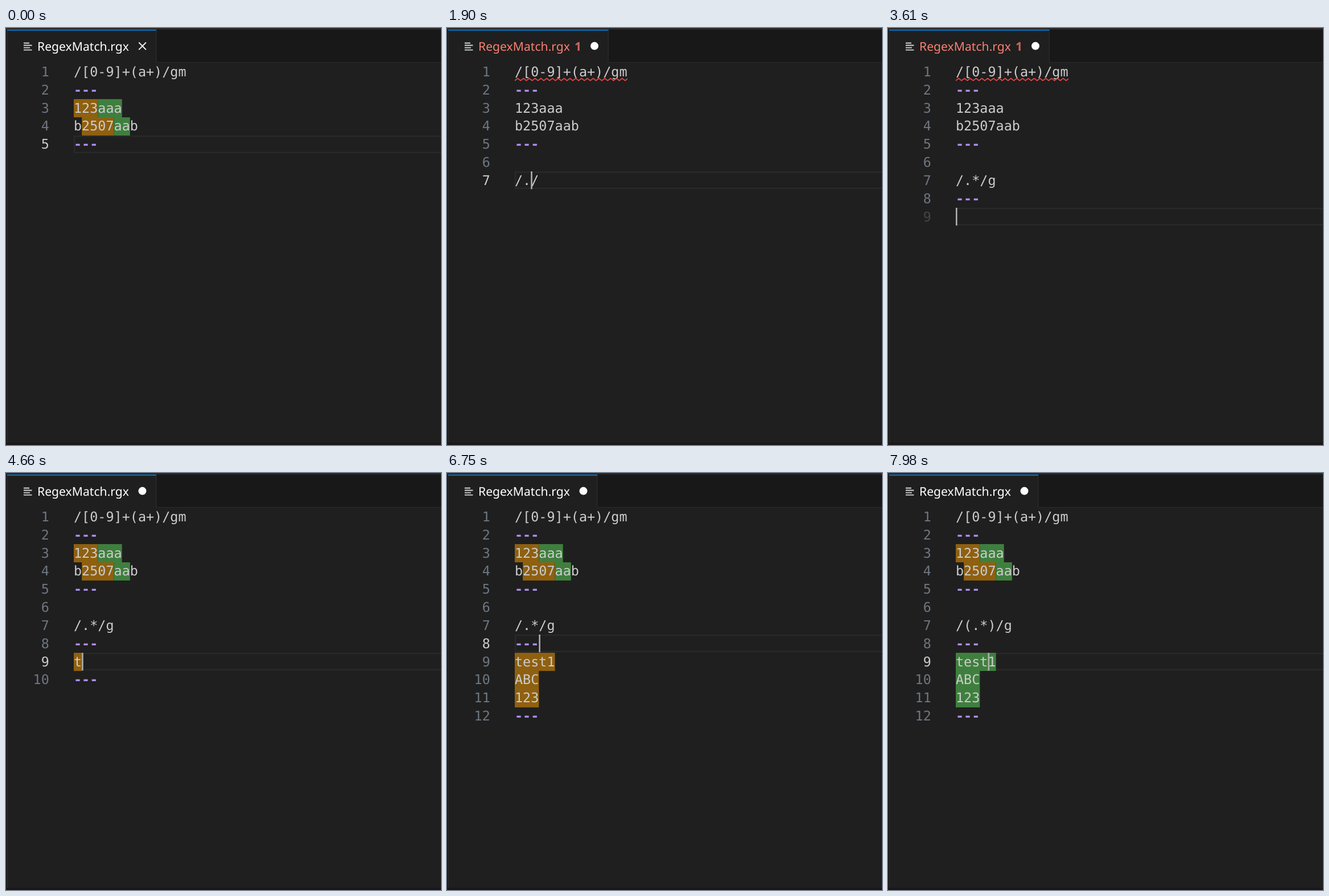
An HTML page that plays this animation: 764 by 733 pixels, repeating every 8 s.

```html
<!DOCTYPE html>
<html lang="en">
<head>
<meta charset="utf-8">
<title>Editor</title>
<style>
  html, body { margin: 0; width: 100%; height: 100%; overflow: hidden; background: #1f1f1f; }
  svg { display: block; width: 764px; height: 733px; }
  text { font: 23.45px "DejaVu Sans Mono", monospace; fill: #ccc; white-space: pre; text-rendering: geometricPrecision; }
  .rule { font-weight: bold; fill: #ae8ff2; }
  .num { text-anchor: end; fill: #6e7681; }
  .active { fill: #ccc; }
  .dim { fill: #43464b; }
  .tab { font: 21.15px "Noto Sans", "Open Sans", sans-serif; fill: #fff; }
  .bad { fill: #f88070; }
  .count { font-weight: 600; fill: #c9695d; }
</style>
</head>
<body>
<svg id="stage" viewBox="0 0 764 733"></svg>
<script>
const LOOP = 8000, LEFT = 119, CHAR = 14.117, ROW = 31.83, TOP = 61.5, BASELINE = 84.9;
const ORANGE = '#8f600f', GREEN = '#3f7f3e';
const HEAD = ['/[0-9]+(a+)/gm', '---', '123aaa', 'b2507aab', '---'];
const ERROR_FROM = 950, ERROR_TO = 4090;

// [start ms, lines below the head joined by "|", cursor row, column, selection start]
const STEPS = [
  [0, null, 5, 3],
  [100, '', 6, 0],
  [380, '|', 7, 0],
  [860, '|//', 7, 1],
  [1710, '|/./', 7, 2],
  [2000, '|/.*/', 7, 3],
  [2280, '|/.*/', 7, 4],
  [2470, '|/.*/g', 7, 5],
  [2660, '|/.*/g|', 8, 0],
  [3140, '|/.*/g|-', 8, 1],
  [3230, '|/.*/g|--', 8, 2],
  [3330, '|/.*/g|---', 8, 3],
  [3520, '|/.*/g|---|', 9, 0],
  [3800, '|/.*/g|---|-', 9, 1],
  [3900, '|/.*/g|---|--', 9, 2],
  [3990, '|/.*/g|---|---', 9, 3],
  [4370, '|/.*/g|---||---', 9, 0],
  [4560, '|/.*/g|---|t|---', 9, 1],
  [4850, '|/.*/g|---|te|---', 9, 2],
  [4940, '|/.*/g|---|tes|---', 9, 3],
  [5040, '|/.*/g|---|test|---', 9, 4],
  [5130, '|/.*/g|---|test1|---', 9, 5],
  [5320, '|/.*/g|---|test1||---', 10, 0],
  [5510, '|/.*/g|---|test1|A|---', 10, 1],
  [5610, '|/.*/g|---|test1|AB|---', 10, 2],
  [5800, '|/.*/g|---|test1|ABC|---', 10, 3],
  [6080, '|/.*/g|---|test1|ABC||---', 11, 0],
  [6180, '|/.*/g|---|test1|ABC|1|---', 11, 1],
  [6270, '|/.*/g|---|test1|ABC|12|---', 11, 2],
  [6370, '|/.*/g|---|test1|ABC|123|---', 11, 3]
];
const typed = STEPS[STEPS.length - 1][1], wrapped = typed.replace('.*', '(.*)');
STEPS.push(
  [6460, typed, 10, 3],
  [6560, typed, 9, 3],
  [6650, typed, 8, 3],
  [6840, typed, 7, 3],
  [6940, typed, 7, 2],
  [7030, typed, 7, 1],
  [7130, typed, 7, 2, 1],
  [7220, typed, 7, 3, 1],
  [7510, wrapped, 7, 4, 2],
  [7890, wrapped, 8, 3],
  [7980, wrapped, 9, 4]
);

const rect = (x, y, w, h, fill) => `<rect x="${x}" y="${y}" width="${w}" height="${h}" fill="${fill}"/>`;
const text = (x, y, s, cls = '') => `<text x="${x}" y="${y}" class="${cls}">${s}</text>`;
const line = (d, color, w) => `<path d="${d}" fill="none" stroke="${color}" stroke-width="${w}"/>`;
const colX = col => LEFT + col * CHAR;
const rowY = row => Math.round(TOP + (row - 1) * ROW);
const baseY = row => Math.round(BASELINE + (row - 1) * ROW);
const mark = (row, from, to, color) =>
  rect(colX(from), rowY(row), (to - from) * CHAR, rowY(row + 1) - rowY(row), color);

function drawFrame(dirty, error) {
  const edge = error ? 283.5 : 264;
  let out = rect(0, 0, 764, 733, '#1f1f1f') + rect(0, 0, 2, 733, '#191919')
    + rect(2, 0, 1.2, 733, '#2d2d2d') + rect(edge, 3, 500, 57.5, '#181818')
    + rect(edge - 1, 3, 1.4, 57.5, '#2b2b2b') + rect(edge, 59.8, 500, 1.4, '#292929')
    + rect(0, 0, 764, 2.5, '#2a2a2a') + rect(2, 2.7, edge - 2, 2, '#0b76c8')
    + rect(0, 729, 764, 4, '#1b1718')
    + line('M31 26.5h10M31 30.5h14.5M31 34.6h11M31 38.7h14.5', '#d4d7d6', 1.8)
    + text(55, 40, 'RegexMatch.rgx', error ? 'tab bad' : 'tab');
  if (error) out += text(224, 40, '1', 'tab count');
  return out + (dirty
    ? `<circle cx="${error ? 259 : 239.5}" cy="31.6" r="7" fill="#fff"/>`
    : line('M233.3 25.3l12.6 12.8m0-12.8l-12.6 12.8', '#fff', 1.9));
}

function drawMatches(lines) {
  let out = mark(3, 0, 3, ORANGE) + mark(3, 3, 6, GREEN) + mark(4, 1, 5, ORANGE) + mark(4, 5, 7, GREEN);
  const color = (lines[6] || '').includes('(') ? GREEN : ORANGE;
  for (let row = 9; row < lines.length; row++) out += mark(row, 0, lines[row - 1].length, color);
  return out;
}

function squiggle() {
  let d = `M${LEFT} 92.5`;
  for (let x = LEFT; x < 316; x += 10.2) d += 'l5.1 -4l5.1 4';
  return `<clipPath id="under"><rect x="${LEFT}" y="84" width="198" height="12"/></clipPath>`
    + `<g clip-path="url(#under)">${line(d, '#e5484a', 1.7)}</g>`;
}

function draw(t, [, tail, row, col, anchor]) {
  const error = t >= ERROR_FROM && t < ERROR_TO, dirty = tail !== null;
  const lines = dirty ? HEAD.concat(tail.split('|')) : HEAD;
  let out = drawFrame(dirty, error);
  if (anchor === undefined) {
    out += `<rect x="120.2" y="${rowY(row) + 1.2}" width="660" height="${ROW - 3.2}" fill="none" stroke="#292929" stroke-width="2.4"/>`;
  }
  if (!error) out += drawMatches(lines);
  if (anchor !== undefined) out += mark(row, anchor, col, '#264f78');
  lines.forEach((s, i) => {
    const n = i + 1, y = baseY(n);
    const lastEmpty = n === lines.length && !s;
    out += text(75.8, y, n, 'num ' + (lastEmpty ? 'dim' : n === row ? 'active' : ''));
    if (s) out += text(LEFT, y, s, s === '---' ? 'rule' : '');
  });
  if (error) out += squiggle();
  if (dirty) out += rect(colX(col), rowY(row), 2.6, ROW - 0.6, '#aeafad');
  return out;
}

const stage = document.getElementById('stage');
let shown = '';
function tick() {
  const t = performance.now() % LOOP;
  const picture = draw(t, STEPS.filter(s => s[0] <= t).pop());
  if (picture !== shown) stage.innerHTML = shown = picture;
  requestAnimationFrame(tick);
}
tick();
</script>
</body>
</html>
```
